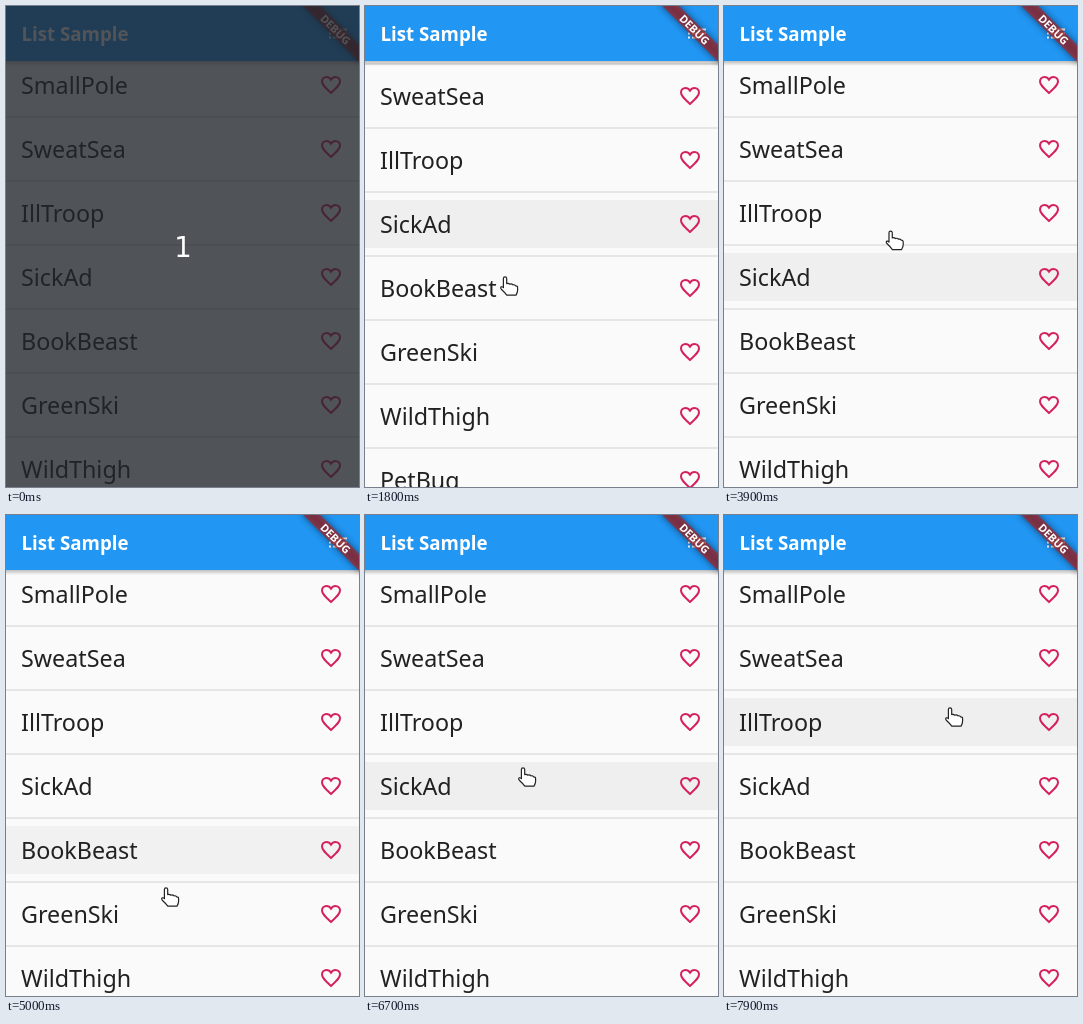
An HTML page for the animation above (8000 ms loop, 353 px wide and 481 px high).

```html
<!DOCTYPE html>
<html lang="en">
<head>
<meta charset="utf-8">
<title>List Sample</title>
<style>
  html, body { margin: 0; width: 100%; height: 100%; overflow: hidden; background: #fafafa; }
  svg { display: block; width: 353px; height: 481px; }
  text { font-family: "Noto Sans", "Open Sans", sans-serif; }
  .item { font-size: 23.3px; fill: #212121; }
  .title { font-size: 18.7px; font-weight: 700; fill: #fff; }
  .ribbon { font-size: 10.8px; font-weight: 900; fill: #fff; text-anchor: middle; }
  .count { font: 27.5px "DejaVu Sans", sans-serif; fill: #fff; text-anchor: middle; }
</style>
</head>
<body>
<svg viewBox="0 0 353 481">
  <defs>
    <path id="heart" fill="none" stroke="#d4205f" stroke-width="2"
      d="M0 8C-5.5 3-9 0-9-3.5A4.5 4.5 0 0 1-4.5-8C-2.7-8-1-7 0-5.4 1-7 2.7-8 4.5-8A4.5 4.5 0 0 1 9-3.5C9 0 5.5 3 0 8z"/>
    <linearGradient id="shade" x2="0" y2="1">
      <stop stop-color="#000" stop-opacity=".24"/>
      <stop offset="1" stop-color="#000" stop-opacity="0"/>
    </linearGradient>
    <filter id="blur" x="-20%" y="-120%" width="140%" height="340%">
      <feGaussianBlur stdDeviation="3.5"/>
    </filter>
  </defs>
  <rect width="353" height="481" fill="#fafafa"/>
  <g id="list">
    <rect id="hover" width="353" height="48" fill="#efefef"/>
  </g>
  <rect y="55" width="353" height="5" fill="url(#shade)"/>
  <rect width="353" height="55" fill="#2196f3"/>
  <text class="title" x="15.5" y="34.5">List Sample</text>
  <path stroke="#fff" stroke-width="2" stroke-dasharray="2 2 14" d="M323 23.5h18M323 27.5h18M323 31.5h18"/>
  <g transform="translate(353 0) rotate(45)">
    <rect x="-42" y="27.4" width="84" height="12" opacity=".5" filter="url(#blur)"/>
    <rect x="-42" y="27.4" width="84" height="12" fill="#b71c1c" opacity=".63"/>
    <text class="ribbon" y="37.3">DEBUG</text>
  </g>
  <g id="cursor" fill="#fff" stroke="#222" stroke-width="1.2" stroke-linejoin="round">
    <path id="hand" d="M-5.6-7.5q0-1.7 1.6-1.7t1.7 1.7V-2.4Q-.6-3.2 .9-1.8 2.6-2.6 4-1.1 5.6-1.6 6.7-.2 8.6-.3 8.6 1.8V4.3Q8.6 6.3 7 9.2H-2.2Q-4.4 6.2-7.7 3.2-9 1.4-7.6.8-6.5.5-5.6 1.7z"/>
    <path id="arrow" d="M-5-9V5l3.2-3 2.2 5.2 2.4-1L.6 1.2H5z"/>
  </g>
  <g id="veil">
    <rect width="353" height="481" fill="#21242a" opacity=".78"/>
    <text class="count" x="177" y="251">1</text>
  </g>
</svg>
<script>
const LOOP = 8000, STEP = 100, BAR = 55, ROW = 48, PITCH = 64, NOTCH = 53, MOVE = 400;
const FIRST = BAR + ROW / 2;
const names = ["SmallPole", "SweatSea", "IllTroop", "SickAd", "BookBeast", "GreenSki",
  "WildThigh", "PetBug", "TightMode", "RowCruise", "BlackTrap"];

// Times of single wheel notches.
const down = [1800, 2000, 2500, 2700, 2900, 7000, 7400];
const up = [3300, 3300, 3400, 3400, 3600, 7600, 7700];

// Stops of the pointer: arrival time, x, y.
const stops = [[500, 66, 26], [900, 108, 219], [1300, 144, 280], [4200, 190, 201],
  [4600, 134, 325], [4900, 158, 362], [5000, 164, 382], [5500, 172, 212], [6000, 190, 70],
  [6200, 186, 43], [6600, 164, 270], [6700, 162, 262], [7000, 221, 215], [7900, 230, 202]];

const $ = id => document.getElementById(id);
const list = $("list"), hover = $("hover"), cursor = $("cursor");
const show = (el, on) => el.setAttribute("visibility", on ? "inherit" : "hidden");
const easeOut = k => 1 - (1 - k) ** 3;

function add(tag, attrs, text = "") {
  const el = document.createElementNS("http://www.w3.org/2000/svg", tag);
  for (const key in attrs) el.setAttribute(key, attrs[key]);
  el.textContent = text;
  list.append(el);
}

names.forEach((name, i) => {
  const y = FIRST + i * PITCH;
  add("text", { class: "item", x: 15, y: y + 9 }, name);
  add("use", { href: "#heart", x: 325, y });
  add("rect", { y: y + PITCH / 2 - 1, width: 353, height: 2, fill: "#e6e6e6" });
});

const passed = (times, t) => times.filter(at => at <= t).length;
const scrollAt = t => NOTCH * (passed(down, t) - passed(up, t));

// The pointer rests at a stop, then glides to the next in at most MOVE ms.
function pointerAt(t) {
  const next = stops.findIndex(s => s[0] > t);
  if (next === 0) return null;
  if (next < 0) return stops[stops.length - 1].slice(1);
  const [from, x, y] = stops[next - 1], [to, nx, ny] = stops[next];
  const k = easeOut(Math.max(0, 1 - (to - t) / Math.min(MOVE, to - from)));
  return [x + (nx - x) * k, y + (ny - y) * k];
}

const tipOf = pos => pos[1] - 8;

// Row under the fingertip, or -1 over the bar and the gaps.
function rowAt(t) {
  const pos = pointerAt(t);
  if (!pos || tipOf(pos) < BAR) return -1;
  const y = tipOf(pos) + scrollAt(t) - FIRST;
  const row = Math.round(y / PITCH);
  return Math.abs(y - row * PITCH) <= ROW / 2 ? row : -1;
}

function draw(time) {
  const t = Math.floor(time / STEP) * STEP;
  list.setAttribute("transform", `translate(0 ${-scrollAt(t)})`);

  // The hover tint trails the pointer by one step.
  const row = rowAt(t - STEP);
  show(hover, row >= 0);
  hover.setAttribute("y", FIRST + row * PITCH - ROW / 2);
  hover.setAttribute("opacity", rowAt(t) < 0 ? 0.8 : 1);

  const pos = pointerAt(t);
  show(cursor, pos);
  if (pos) {
    cursor.setAttribute("transform", `translate(${pos[0]} ${pos[1]})`);
    const onBar = tipOf(pos) < BAR;
    show($("arrow"), onBar);
    show($("hand"), !onBar);
  }
  show($("veil"), t < STEP);
}

const start = performance.now();
function tick(now) {
  draw(Math.max(0, now - start) % LOOP);
  requestAnimationFrame(tick);
}
draw(0);
requestAnimationFrame(tick);
</script>
</body>
</html>
```
